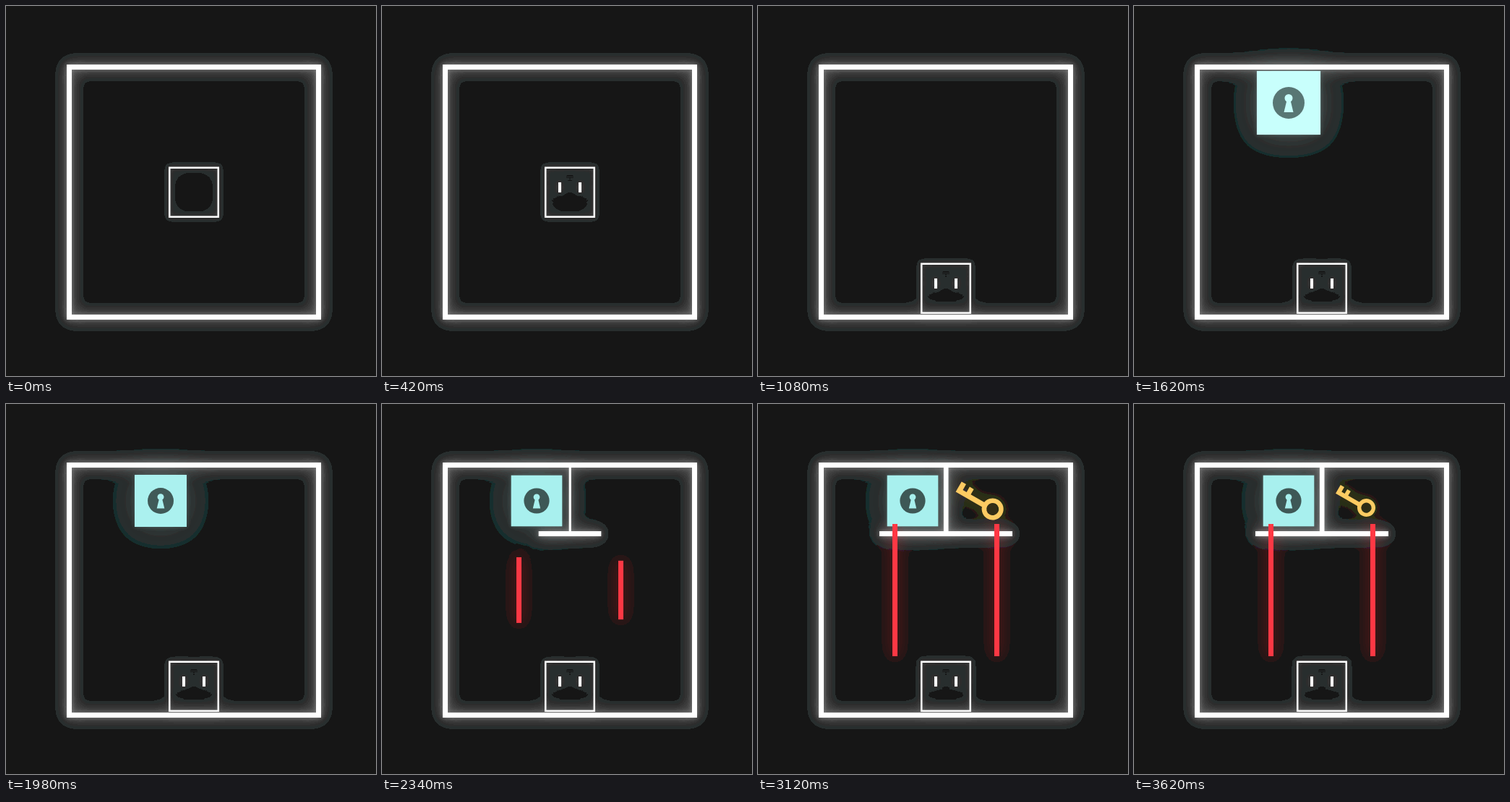
An HTML page for the animation above (3640 ms loop, 512 px wide and 512 px high).

```html
<!DOCTYPE html>
<html lang="en">
<head>
<meta charset="utf-8">
<title>Neon room</title>
<style>
html, body { margin: 0; width: 100%; height: 100%; overflow: hidden; background: #171717; }
svg { display: block; width: 100vw; height: 100vh; }
</style>
</head>
<body>
<svg viewBox="0 0 512 512">
  <defs>
    <filter id="tight" filterUnits="userSpaceOnUse" x="0" y="0" width="512" height="512" color-interpolation-filters="sRGB"><feGaussianBlur stdDeviation="3"/></filter>
    <filter id="wide" filterUnits="userSpaceOnUse" x="0" y="0" width="512" height="512" color-interpolation-filters="sRGB"><feGaussianBlur stdDeviation="10"/></filter>
    <filter id="haze" filterUnits="userSpaceOnUse" x="0" y="0" width="512" height="512" color-interpolation-filters="sRGB"><feGaussianBlur stdDeviation="24"/></filter>
    <filter id="bands" filterUnits="userSpaceOnUse" x="0" y="0" width="512" height="512" color-interpolation-filters="sRGB">
      <feComponentTransfer>
        <feFuncR id="bandR" type="discrete"/>
        <feFuncG id="bandG" type="discrete"/>
        <feFuncB id="bandB" type="discrete"/>
      </feComponentTransfer>
    </filter>
  </defs>
  <g id="glow" filter="url(#bands)"></g>
  <g id="solid"></g>
</svg>
<script>
const LOOP = 3640, STEP = 60, GROW = 833;
const $ = id => document.getElementById(id);
const clamp = v => Math.max(0, Math.min(1, v));
const mix = (a, b, p) => a + (b - a) * p;
const part = (t, start, length) => clamp((t - start) / length);
const easeOut = p => 1 - (1 - p) ** 2;
const backOut = p => 1 + 4 * (p - 1) ** 3 + 3 * (p - 1) ** 2;

// Light falls off in flat bands; the faintest one is slightly teal.
function setBands(id, faint) {
  const values = Array.from({ length: 32 }, (_, i) =>
    (i === 0 ? 23 : i === 1 ? faint : 35 + i * 5.5) / 255);
  $(id).setAttribute("tableValues", values.map(v => v.toFixed(3)).join(" "));
}
setBands("bandR", 40);
setBands("bandG", 47);
setBands("bandB", 47);

// Rectangle given by its centre and size
const bar = (cx, cy, w, h, fill = "#fff") =>
  `<rect x="${cx - w / 2}" y="${cy - h / 2}" width="${w}" height="${h}" fill="${fill}"/>`;
const box = (x, y, w, h, line) =>
  `<rect x="${x}" y="${y}" width="${w}" height="${h}" fill="none" stroke="#fff" stroke-width="${line}"/>`;
const group = (attrs, body) => `<g ${attrs}>${body}</g>`;
const blur = (name, opacity, body) => group(`filter="url(#${name})" opacity="${opacity}"`, body);

function lock(scale) {
  if (scale <= 0) return "";
  const heat = clamp((scale - 1) / 0.25);
  const tone = (r, g, b, r2, g2, b2) =>
    `rgb(${mix(r, r2, heat)},${mix(g, g2, heat)},${mix(b, b2, heat)})`;
  const face = tone(168, 240, 238, 200, 255, 252);
  return group(`transform="translate(214 134) scale(${scale})"`,
    bar(0, 0, 70.6, 70.6, face) +
    `<circle r="17.6" fill="${tone(62, 88, 86, 88, 118, 116)}"/>` +
    `<g fill="${face}"><circle cy="-5.2" r="4.4"/><path d="M-2-3H2L5.2 10.4H-5.2Z"/></g>`);
}

function key(scale, color) {
  if (scale <= 0) return "";
  return group(`transform="translate(306 134) rotate(30) scale(${scale})"`,
    `<circle cx="18.2" cy=".5" r="9.8" fill="none" stroke="${color}" stroke-width="5.4"/>` +
    `<path fill="${color}" d="M-28.5-9H-22.5V-1.5H-17.5V-8.5H-12V-1.5H9V4.5H-28.5Z"/>`);
}

function draw(t) {
  const top = mix(222.5, 355.5, part(t, 665, 415) ** 2);
  const open = easeOut(part(t, 30, 420));
  const wallP = easeOut(part(t, 2113, GROW));
  const lockP = backOut(part(t, 1220, GROW));
  const keyP = backOut(part(t, 2800, GROW));
  const sway = 0.17 * Math.sin(Math.PI * part(t, 2340, 720));

  const frame = box(87.5, 84.5, 345, 346, 7);
  const body = box(226.25, top + 1.25, 67.5, 68, 2.5);
  const eyes = open ? bar(246, top + 28.5, 4, 14 * open) + bar(274, top + 28.5, 4, 14 * open) : "";
  const walls = wallP
    ? bar(260.2, 132, 6.6 * wallP, 90) + bar(260, 179.5, 184 * wallP, 7) : "";
  const beams = color => [[189.5, 2098], [330.5, 2128]].map(([x, start]) => {
    const p = easeOut(part(t, start, GROW));
    return p ? bar(x, 257.5, 7, 183 * p, color) : "";
  }).join("");

  const turn = `transform="rotate(${sway} 256 256)"`;
  $("glow").innerHTML = `<rect width="512" height="512"/>` + group(turn,
    blur("haze", 0.4, lock(lockP)) +
    blur("wide", 0.75, frame + walls) +
    blur("wide", 0.38, body) +
    blur("wide", 0.6, eyes) +
    blur("wide", 0.55, beams("#ff0014")) +
    blur("wide", 0.25, key(keyP, "#ffb43c")) +
    blur("tight", 0.45, frame + walls) +
    blur("tight", 0.25, body + eyes + lock(lockP)));
  $("solid").innerHTML = group(turn,
    frame + body + eyes + lock(lockP) + walls + beams("#ff3844") + key(keyP, "#fdcb62"));
}

let origin = null, shown = -1;
function tick(now) {
  if (origin === null) origin = now;
  const t = (now - origin) % LOOP;
  const held = t >= 3620 ? 3620 : Math.floor(t / STEP) * STEP;
  if (held !== shown) draw(shown = held);
  requestAnimationFrame(tick);
}
draw(0);
requestAnimationFrame(tick);
</script>
</body>
</html>
```
